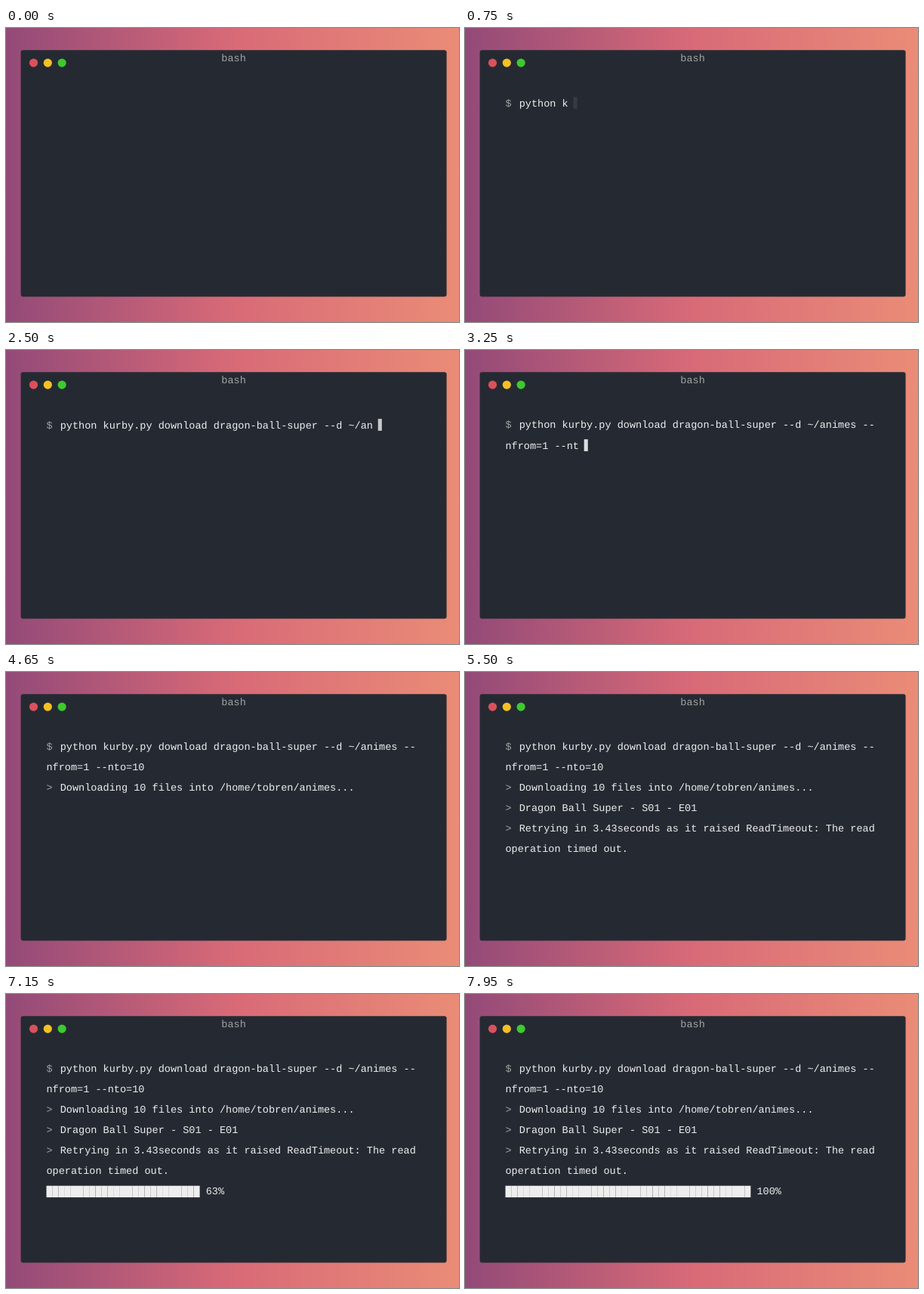
Animation of 600 by 389 pixels, one loop 8 s. Source, as an HTML page with a canvas:

```html
<!DOCTYPE html>
<html lang="en">
<head>
<meta charset="utf-8">
<title>bash</title>
<style>
  html, body { margin: 0; width: 100%; height: 100%; overflow: hidden; }
  canvas { display: block; width: 600px; height: 389px; }
</style>
</head>
<body>
<canvas id="stage"></canvas>
<script>
const W = 600, H = 389, LOOP = 8000;
const SCALE = 0.752;               // terminal is laid out at 750 px, then scaled down
const FONT = 18, CHAR = FONT * 1229 / 2048, LINE = 36;
const PAD_X = 45, PAD_TOP = 75, BASE = 23;
const PROMPT = CHAR + 0.75 * FONT;
const TEXT = '#eeeeee', SUBTLE = '#a2a2a2';

const TYPE = 40, PAUSE = 686, START = 425;
const COMMAND = 'python kurby.py download dragon-ball-super --d ~/animes --nfrom=1 --nto=10';
const WRAP = 58;
const OUTPUT = [
  { row: 2, lines: ['Downloading 10 files into /home/tobren/animes...'] },
  { row: 3, lines: ['Dragon Ball Super - S01 - E01'] },
  { row: 4, lines: ['Retrying in 3.43seconds as it raised ReadTimeout: The read', 'operation timed out.'] },
];
const OUTPUT_START = START + COMMAND.length * TYPE + PAUSE;
const BAR_START = OUTPUT_START + OUTPUT.length * PAUSE;
const BAR_LENGTH = 40, BAR_ROW = 6;

const canvas = document.getElementById('stage');
const ctx = canvas.getContext('2d');
const dpr = window.devicePixelRatio || 1;
canvas.width = W * dpr;
canvas.height = H * dpr;

// CSS "ease": cubic-bezier(.25, .1, .25, 1)
function ease(x) {
  let lo = 0, hi = 1, u = 0.5;
  const bez = (a, b) => 3 * a * u * (1 - u) ** 2 + 3 * b * u * u * (1 - u) + u ** 3;
  for (let i = 0; i < 20; i++) {
    u = (lo + hi) / 2;
    if (bez(0.25, 0.25) < x) lo = u; else hi = u;
  }
  return bez(0.1, 1);
}

function blink(t) {
  const p = (t % 1000) / 500;
  return p < 1 ? 1 - ease(p) : ease(p - 1);
}

const baseline = row => PAD_TOP + row * LINE + BASE;

function write(text, x, y, color = TEXT) {
  ctx.fillStyle = color;
  ctx.fillText(text, x, y);
}

function drawBackground() {
  const g = ctx.createLinearGradient(0, 0, W, 0);
  g.addColorStop(0, '#934a78');
  g.addColorStop(0.5, '#d86a77');
  g.addColorStop(1, '#ea8c77');
  ctx.fillStyle = g;
  ctx.fillRect(0, 0, W, H);
}

function drawWindow() {
  ctx.fillStyle = '#252a32';
  ctx.beginPath();
  ctx.roundRect(0, 0, 750, 434, 4);
  ctx.fill();
  ['#d9515d', '#f4c025', '#3ec930'].forEach((color, i) => {
    ctx.fillStyle = color;
    ctx.beginPath();
    ctx.arc(22.5 + 25 * i, 22.5, 7.5, 0, 2 * Math.PI);
    ctx.fill();
  });
  write('bash', 375 - 2 * CHAR, 20, SUBTLE);
}

function drawCursor(x, y, alpha) {
  ctx.globalAlpha = alpha;
  ctx.fillStyle = TEXT;
  ctx.fillRect(x + FONT / 2, y - 0.928 * FONT, 0.376 * FONT, 1.164 * FONT);
  ctx.globalAlpha = 1;
}

function drawCommand(t) {
  if (t < START) return;
  const n = Math.min(COMMAND.length, Math.floor((t - START) / TYPE));
  const active = t < OUTPUT_START;
  const wrapped = n >= WRAP;
  // the cursor's taller font pushes its own line down a little
  const y0 = baseline(0) + (active && !wrapped ? 1 : 0);
  const y1 = baseline(1) + (active ? 1 : 0);
  write('$', PAD_X, y0, SUBTLE);
  write(COMMAND.slice(0, Math.min(n, WRAP)), PAD_X + PROMPT, y0);
  if (wrapped) write(COMMAND.slice(WRAP, n), PAD_X, y1);
  if (!active) return;
  const x = PAD_X + (wrapped ? (n - WRAP) * CHAR : PROMPT + n * CHAR);
  drawCursor(x, wrapped ? y1 : y0, blink(t - START));
}

function drawOutput(t) {
  OUTPUT.forEach(({ row, lines }, i) => {
    if (t < OUTPUT_START + i * PAUSE) return;
    write('>', PAD_X, baseline(row), SUBTLE);
    lines.forEach((line, j) => write(line, PAD_X + (j ? 0 : PROMPT), baseline(row + j)));
  });
}

function drawBar(t) {
  const n = Math.min(BAR_LENGTH, Math.floor((t - BAR_START) / TYPE));
  if (n < 1) return;
  const percent = Math.round(n / BAR_LENGTH * 100);
  write('█'.repeat(n) + ' ' + percent + '%', PAD_X, baseline(BAR_ROW));
}

function draw(t) {
  ctx.setTransform(dpr, 0, 0, dpr, 0, 0);
  drawBackground();
  ctx.translate(19.6, 29.2);
  ctx.scale(SCALE, SCALE);
  ctx.font = FONT + 'px "Liberation Mono", monospace';
  ctx.textRendering = 'geometricPrecision';
  drawWindow();
  drawCommand(t);
  drawOutput(t);
  drawBar(t);
}

const begin = performance.now();
function tick() {
  draw((performance.now() - begin) % LOOP);
  requestAnimationFrame(tick);
}
tick();
</script>
</body>
</html>
```
